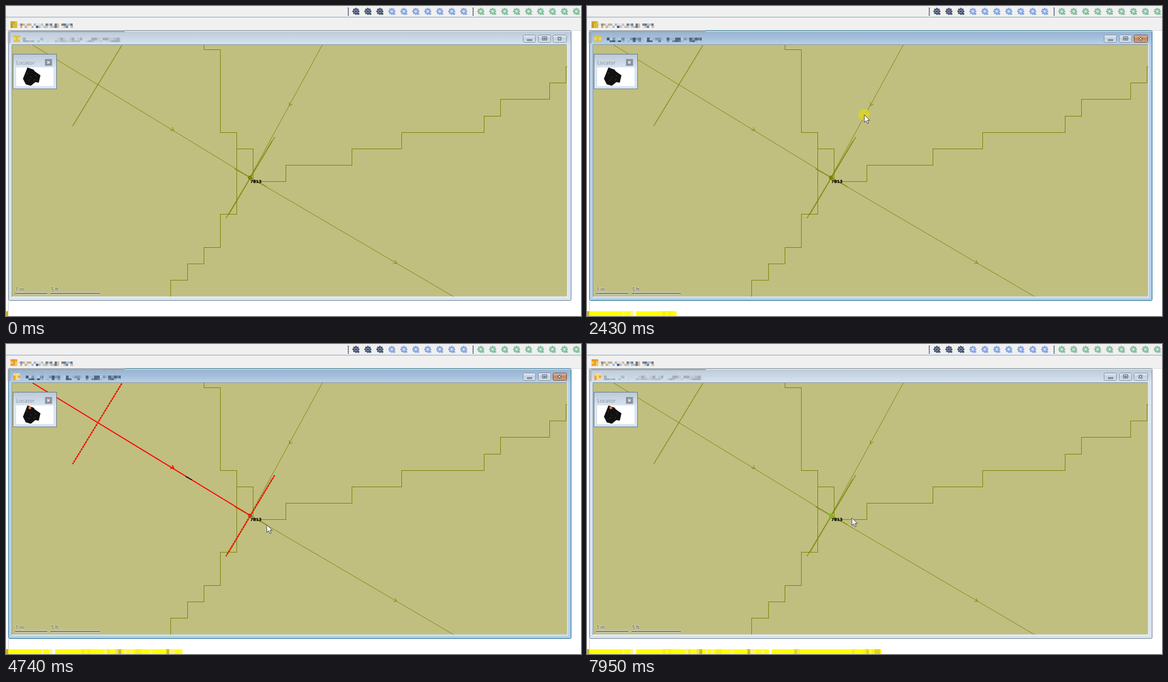
An HTML page for the animation above (8000 ms loop, 1018 by 550 pixels).

```html
<!DOCTYPE html>
<html lang="en">
<head>
<meta charset="utf-8">
<title>Map window</title>
<style>
html, body { margin: 0; width: 100%; height: 100%; overflow: hidden; background: #fff; }
svg { display: block; position: absolute; left: 0; top: 0; }
text { font-family: "Open Sans", "Noto Sans", sans-serif; }
.crisp { shape-rendering: crispEdges; }
</style>
</head>
<body>
<svg id="stage" width="1018" height="550" viewBox="0 0 1018 550"></svg>
<script>
const LOOP = 8000, STEP = LOOP / 115;
const OLIVE = '#808000', MAP = '#c0bf80', RED = '#ff0000';

let seed = 7;
const random = () => (seed = (seed * 16807) % 2147483647) / 2147483647;
const pick = list => list[Math.floor(random() * list.length)];
const rect = (x, y, w, h, fill, extra = '') =>
  `<rect x="${x}" y="${y}" width="${w}" height="${h}" fill="${fill}" ${extra}/>`;
const path = (d, stroke, width = 1, extra = '') =>
  `<path d="${d}" fill="none" stroke="${stroke}" stroke-width="${width}" ${extra}/>`;
const group = (id, content, extra = '') => `<g id="${id}" ${extra}>${content}</g>`;

function mosaic(x0, x1, y0, y1, size, colors, density = 1) {
  let out = '';
  for (let y = y0; y < y1; y += size)
    for (let x = x0; x < x1; x += size)
      if (random() < density)
        out += rect(x, y, Math.min(size, x1 - x), Math.min(size, y1 - y), pick(colors));
  return out;
}

function gear(x, main, light, center) {
  let teeth = '';
  for (let a = 0; a < 360; a += 45)
    teeth += `<rect x="-1.4" y="-6.2" width="2.8" height="4" fill="${main}" transform="rotate(${a})"/>`;
  return `<g transform="translate(${x} 9.5)">${teeth}<circle r="4.5" fill="${main}"/>` +
    `<circle r="3" fill="${light}"/><circle r="1.5" fill="${center}"/>` +
    `<path d="M2 2l4 1v3h-4z" fill="${main}"/></g>`;
}

function toolbar() {
  let out = rect(0, 0, 1018, 43, '#f0f0f0') + rect(0, 19, 1018, 1.4, '#a3b6c4');
  for (const x of [606, 827])
    for (let y = 3; y < 17; y += 3) out += rect(x - 1, y, 2, 2, '#45566f');
  for (let i = 0; i < 10; i++)
    out += i < 3 ? gear(619.5 + i * 21.2, '#444f66', '#8294b8', '#333b4c')
                 : gear(619.5 + i * 21.2, '#84a3e0', '#a9c0ee', '#e6edfa');
  for (let i = 0; i < 9; i++) out += gear(840.5 + i * 21.15, '#82bd9d', '#a5d4b8', '#e3f2e9');
  return out;
}

const tabLabel = () => mosaic(21, 62, 31, 39, 4, ['#555b66', '#8c8f98', '#a4bcd6', '#c9b393', '#e1e1e1', '#d9e4ef'], .8) +
  mosaic(62, 119, 31, 39, 4, ['#8b8178', '#6b7c94', '#aac5df', '#d3c0a5', '#e4e4e4'], .75);

const icon = (x, y, colors) => mosaic(x, x + 12, y, y + 12, 4, colors);

function frame(active) {
  const edge = active ? '#286c8b' : '#737e8b';
  const fill = active ? '#b9d1ea' : '#d7e4f2';
  const gradient = active ? 'activeTitle' : 'idleTitle';
  const colors = active ? ['#465c78', '#6a829f', '#7f9ab6', '#9bb7d4', '#b5cae0', '#59677b']
                        : ['#a6afb9', '#b4bec9', '#c0cad5', '#cbd5e0'];
  const buttons = [[915, 23], [942, 23], [968, 25]].map(([x, w], i) =>
    rect(x + .5, 51.5, w - 1, 13, active && i === 2 ? 'url(#closeFill)' : 'url(#buttonFill)',
      `rx="2" stroke="${active && i === 2 ? '#705040' : '#8492a2'}"`)).join('');
  const signs = path('M923 59.5h8v2h-8zM949.5 54.5h8v6h-8zM951.5 57h4v1.5h-4z', '#535b67') +
    path('M977 55l6 6m0-6l-6 6', '#535b67', 3) + path('M977 55l6 6m0-6l-6 6', '#fff', 1);
  return rect(4.5, 43.5, 996, 479, fill, `stroke="${edge}" rx="2"`) +
    rect(5, 45, 995, 23, `url(#${gradient})`) + rect(5, 44.3, 995, 1, '#fff', 'opacity=".7"') +
    rect(3, 45, 5, 21, active ? '#9aa9b8' : '#b0b7bf') + rect(8, 43, 202, 3.5, '#a0a7b0') +
    mosaic(30, 66, 56, 64, 5, colors, .85) + mosaic(71, 135, 56, 64, 5, colors, .9) +
    mosaic(141, 203, 56, 64, 5, colors, .95) + buttons + signs +
    rect(10.5, 68.5, 983.5, 448, 'none', 'stroke="#f4f8fb"') +
    path('M10.5 516V68.5H993', '#8796a1') +
    (active ? path('M6 521.5H999V46', '#7fc4e4', 1, 'opacity=".6"') : '');
}

// Links meeting at the junction, with their cross sections.
const links = {
  ul: { line: 'M47 69L432 304', cuts: 'M205 70L118 213M475.5 233L389.5 376.5', arrow: [297, 220.5, 31.4], mark: 'M318 235L329 241' },
  ur: { line: 'M560 69L432 304', cuts: 'M405 289L461 320.5', arrow: [502, 177, 118.6], mark: 'M483.5 211L493 193' },
  lr: { line: 'M432 304L793 516', cuts: 'M470.5 240L395 369', arrow: [691.5, 456.5, 30.4], mark: 'M483.5 334.5L494 340.5' }
};
const arrow = ([x, y, a], color, width) =>
  path('M-5 -3.2L0 0L-5 3.2', color, width, `transform="translate(${x} ${y}) rotate(${a})"`);

function map() {
  let out = rect(11, 69, 982.5, 446.5, MAP);
  out += path('M350.5 69V77.5H379.5V224.5H408.5V369.5H379.5V428.5H350.5V457.5H321.5V486.5H291.5V516' +
    'M408.5 253.5H437.5V311.5H495.5V282.5H612.5V253.5H700.5V224.5H846.5V195.5H875.5V165.5H962.5V136.5H991.5V107.5H994',
    OLIVE, 1, 'class="crisp"');
  for (const { line, cuts, arrow: head } of Object.values(links))
    out += path(line, OLIVE, .9) + path(cuts, OLIVE, 1.6, 'stroke-dasharray="2 .8"') + arrow(head, OLIVE, 1);
  out += '<circle id="node" cx="432" cy="304.5" r="3.7"/>';
  for (const [id, { line, cuts, arrow: head, mark }] of Object.entries(links))
    out += group(id, path(line, RED, 1.8) + path(cuts, RED, 2.4, 'stroke-dasharray="3.5 1.5"') +
      arrow(head, RED, 1.8) + path(mark, '#111', 1.8));
  out += group('traces', path('M497 342L503 345.5M516 353.5L522 357', '#e6b42d', 2));
  out += path('M433 306L426 317', '#111', 2, 'id="nodeMark" stroke-dasharray="3.5 1.5"');
  out += '<text x="432.5" y="313.7" style="font:bold 7.2px \'DejaVu Sans\',sans-serif" stroke="#000" stroke-width=".2">7813</text>';
  const scale = (x, width, label) => `<text x="${x + 1}" y="505.5" font-size="8.5" fill="#40403c" stroke="#dedec0" stroke-width="1.5" paint-order="stroke">${label}</text>` +
    rect(x, 508, width, 4, '#dadabd') + rect(x, 509, width, 2, '#74749c');
  return out + scale(16, 57, '1 m') + scale(79, 87, '5 ft');
}

function locator() {
  return rect(12.5, 85.5, 77, 61.5, '#d9e5f1', 'stroke="#6d7783"') +
    rect(13, 86, 76, 22, 'url(#locatorTitle)') +
    '<text x="18" y="104" font-size="9.3" fill="#858d96">Locator</text>' +
    rect(69, 94, 12.5, 12, '#8b939d') + path('M73 98l4 4m0-4l-4 4', '#fff', 1.4) +
    rect(18, 109, 66, 33, '#fff') +
    '<path d="M38 109L49 113L51 116L61 123L58 136L52 135L44 141.5L35 139L30 129Z" fill="#111"/>' +
    path('M36 118l3 2m4 5l2 2m6-5l3 3m-15 7l3-1m7 1l3-2', '#544b3c', .8) +
    group('place', rect(40, 111, 4.5, 4.5, '#f0792b'));
}

function progress() {
  const shades = ['#ffff00', '#ffff00', '#fff200', '#f4ed28', '#ddd52c', '#c9bd24', '#fff56d', '#e9df5e'];
  const strips = (a, b, density) => {
    let out = '';
    for (let x = a; x < b; x += 5)
      if (random() < density) out += rect(x, 541.5, Math.min(5, b - x), 8.5, pick(shades));
    return out;
  };
  return rect(0, 541.5, 82, 8.5, '#ff0') + rect(87, 541.5, 235, 8.5, '#ff0') + rect(327, 541.5, 200, 8.5, '#ff0') +
    rect(63, 541.5, 3, 8.5, '#fff68c') + rect(77, 541.5, 5, 8.5, '#fff68c') +
    strips(134, 322, .65) + strips(332, 380, .5) + strips(464, 527, .65) +
    rect(0, 541.5, 4, 8.5, '#c8b51b');
}

const gradient = (id, ...colors) => `<linearGradient id="${id}" x2="0" y2="1">` +
  colors.map((c, i) => `<stop offset="${i / (colors.length - 1)}" stop-color="${c}"/>`).join('') + '</linearGradient>';

const stage = document.getElementById('stage');
stage.innerHTML = '<defs>' +
  gradient('activeTitle', '#98b3cf', '#a4bfdb', '#b8d0e9') +
  gradient('idleTitle', '#bdcad8', '#c9d6e4', '#d6e3f1') +
  gradient('locatorTitle', '#bcc9d8', '#d6e2ef') +
  gradient('buttonFill', '#e5edf5', '#c2d0df', '#d8e4ef') +
  gradient('closeFill', '#e3c0a4', '#c38459', '#dba978') +
  '<clipPath id="mapClip"><rect x="11" y="69" width="982.5" height="446.5"/></clipPath>' +
  '<clipPath id="barClip"><rect id="barSize" y="541" height="9"/></clipPath></defs>' +
  rect(0, 0, 1018, 550, '#fff') + toolbar() + rect(0, 43, 1018, 1, '#d5dade') + rect(4, 523, 1, 18, '#c9d0d6') + tabLabel() +
  group('idle', frame(false)) + group('active', frame(true)) +
  group('plainIcons', icon(8, 27, ['#c9a928', '#e0c64d', '#b99d38', '#d8bd35']) + icon(13, 52, ['#e5c743', '#d9bd48', '#f0d96d', '#dcc44a'])) +
  group('hotIcons', icon(8, 27, ['#f2a22b', '#f6c85c', '#f7e6ba', '#e99c22']) + icon(13, 52, ['#f1a12c', '#f5be48', '#f4d98f', '#eea829'])) +
  group('map', map(), 'clip-path="url(#mapClip)"') + locator() +
  group('bar', progress(), 'clip-path="url(#barClip)"') +
  '<circle id="halo" r="10" fill="#dcd22c" opacity=".9"/>' +
  group('cursor', '<path d="M0 0V13.5L3.2 10.6L5.5 15.6L7.7 14.6L5.4 9.8H9.6Z" fill="#fff" stroke="#30303c" stroke-width=".9"/>');

const el = {};
stage.querySelectorAll('[id]').forEach(node => el[node.id] = node);
const show = (id, on) => { el[id].style.display = on ? '' : 'none'; };

// Pointer stops: time, x, y.
const route = [
  [1180, 553, 550], [1660, 484, 197], [1730, 483, 195.5], [2200, 491, 193], [3130, 491, 193],
  [3690, 328, 238], [4060, 328, 238], [4180, 333, 249], [4950, 493.5, 338.5], [5900, 493.5, 338.5],
  [6160, 515, 350], [6350, 510, 348], [6740, 432, 305], [7380, 432, 305], [7720, 469, 308.5], [LOOP, 469, 308.5]
];
// Presses: start, end, x, y.
const presses = [[2330, 2500, 490.5, 192.5], [3830, 4020, 328, 238], [5200, 5400, 493, 338.5], [7100, 7300, 432, 304.5]];

function pointerAt(t) {
  const i = route.findIndex(stop => stop[0] > t);
  if (i < 1) return null;
  const [t0, x0, y0] = route[i - 1], [t1, x1, y1] = route[i];
  const p = (t - t0) / (t1 - t0), e = p * p * (3 - 2 * p);
  return [x0 + (x1 - x0) * e, y0 + (y1 - y0) * e];
}

function draw(t) {
  const between = (a, b) => t >= a && t < b;
  const active = between(2330, 7700), hot = t >= 3440;
  show('active', active);
  show('idle', !active);
  show('plainIcons', !hot);
  show('hotIcons', hot);
  show('place', hot);
  show('ur', between(3440, 4080));
  show('ul', between(4080, 5450));
  show('lr', between(5450, 7330));
  show('traces', between(6200, 7330));
  show('nodeMark', between(6800, 7330));
  el.node.setAttribute('fill', t >= 7330 ? '#80bd00' : between(3440, 7330) ? '#b05a00' : OLIVE);
  el.barSize.setAttribute('width', 4 + t * .0652);

  const press = presses.find(([a, b]) => between(a, b));
  show('halo', press);
  if (press) {
    el.halo.setAttribute('cx', press[2]);
    el.halo.setAttribute('cy', press[3]);
  }
  const at = pointerAt(t);
  show('cursor', at);
  if (at) el.cursor.setAttribute('transform', `translate(${at[0]} ${at[1]})`);
}

const start = performance.now();
function tick() {
  const t = (performance.now() - start) % LOOP;
  draw(Math.floor(t / STEP + .02) * STEP);
  requestAnimationFrame(tick);
}
draw(0);
requestAnimationFrame(tick);
</script>
</body>
</html>
```
